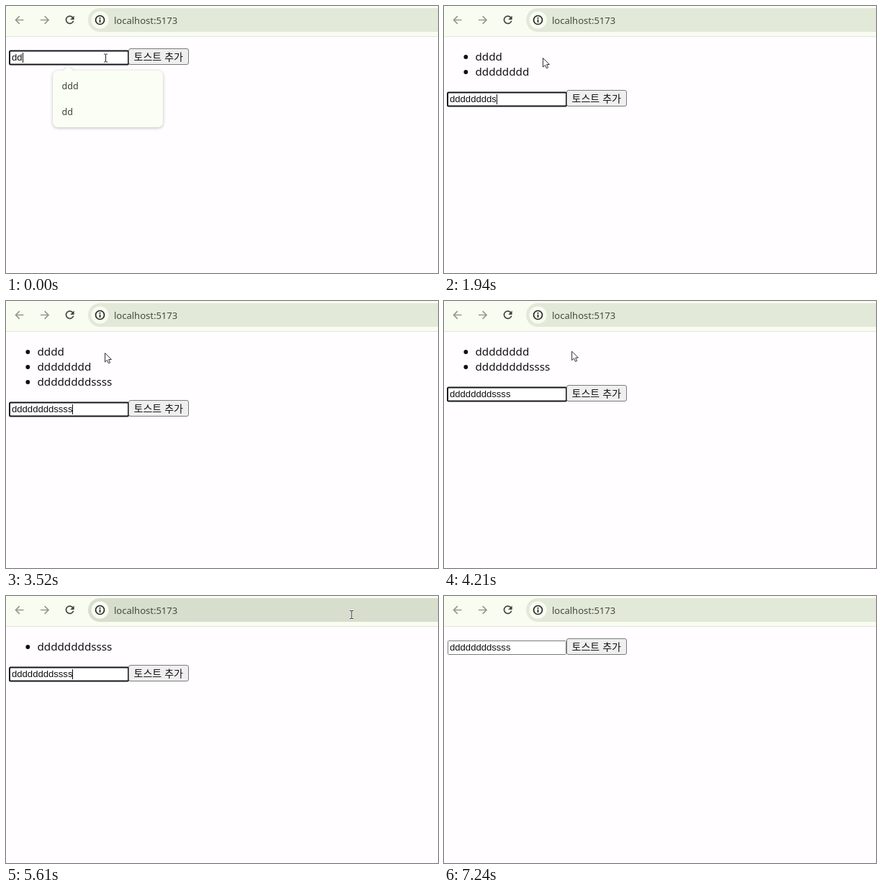
An HTML page that plays this animation: 600 by 372 pixels, repeating every 7.27 s.

```html
<!DOCTYPE html>
<html lang="ko">
<head>
<meta charset="utf-8">
<title>Toast list</title>
<style>
  html, body { margin: 0; width: 100%; height: 100%; overflow: hidden; background: #fffdff; }
  svg { display: block; width: 600px; height: 372px; }
  .ui { font: 13px "Noto Sans", sans-serif; fill: #454a40; }
  .item { font: 15.2px "Noto Sans", sans-serif; fill: #111; }
  .hint { font: 12.5px "Noto Sans", sans-serif; fill: #3b3e38; }
  .field { font: 13.1px "Liberation Sans", sans-serif; fill: #111; }
  .button { font: 14px "Noto Sans CJK KR", "Noto Sans CJK", sans-serif; fill: #111; }
  .icon { fill: none; stroke-width: 1.7; }
  #popup { filter: drop-shadow(0 1px 2px rgba(60, 70, 50, .35)); }
</style>
</head>
<body>
<svg viewBox="0 0 600 372">
  <rect width="600" height="372" fill="#fffdff"/>

  <g id="toolbar">
    <rect width="600" height="42" fill="#f8fcf1"/>
    <rect y="42" width="600" height="1" fill="#e0e6d9"/>
    <rect id="address" x="114" y="3" width="520" height="33" rx="16.5"/>
    <circle cx="130.5" cy="19.5" r="12" fill="#f9fcf2"/>
    <path class="icon" stroke="#959a90" d="M24.5 19.5H13.5M18.8 14.2L13.5 19.5L18.8 24.8"/>
    <path class="icon" stroke="#959a90" d="M48 19.5H59M53.7 14.2L59 19.5L53.7 24.8"/>
    <path class="icon" stroke="#42463d" d="M92.9 16.2A5.2 5.2 0 1 0 93.7 20.6"/>
    <path fill="#42463d" d="M94.6 13.4V18.9H89.1Z"/>
    <circle class="icon" stroke="#23261f" cx="130.5" cy="19.5" r="6"/>
    <path fill="#23261f" d="M129.6 18.7h1.8v4.2h-1.8zM129.6 16h1.8v1.7h-1.8z"/>
    <text class="ui" x="150" y="24.6">localhost:5173</text>
  </g>

  <g id="list"></g>

  <g id="form">
    <rect id="box" fill="#fff"/>
    <text id="value" class="field" x="8" y="76"></text>
    <rect id="caret" y="65" width="1" height="14" fill="#111"/>
    <rect x="170.5" y="59.5" width="83" height="22" rx="2.5" fill="#efefef" stroke="#7b7b7b"/>
    <text class="button" x="177.6" y="75.6">토스트 추가</text>
  </g>

  <g id="popup">
    <path id="bubble" fill="#fbfef4"/>
    <text class="hint" x="77.5" y="116">ddd</text>
    <text id="second" class="hint" x="77.5" y="151.5">dd</text>
  </g>

  <g id="pointer">
    <path id="arrow" fill="#fff" stroke="#333" d="M.5 .5V13L3.4 10.3L5.4 14.8L7.5 13.9L5.6 9.5H9.4Z"/>
    <g id="beam" fill="none">
      <path stroke="#fff" stroke-width="2.6" d="M-2.5 -5.5H2.5M0 -5.5V5.5M-2.5 5.5H2.5"/>
      <path stroke="#222" d="M-2.5 -5.5H-.7L0 -5L.7 -5.5H2.5M0 -5V5M-2.5 5.5H-.7L0 5L.7 5.5H2.5"/>
    </g>
  </g>
</svg>

<script>
const LOOP = 7270, BLINK = 528, BLUR_AT = 7210;

const keys = [
  [0, "d"], [0, "d"], [90, "d"], [290, "d"],
  [1030, "d"], [1180, "d"], [1330, "d"], [1480, "d"],
  [1940, "s"], [2090, "s"], [2240, "s"], [2420, "s"]
];
const toasts = [
  { from: 550, to: 3550, text: "dddd" },
  { from: 1700, to: 4730, text: "dddddddd" },
  { from: 2620, to: 5640, text: "ddddddddssss" }
];
// time, x, y
const path = [
  [0, 138.5, 72.5], [600, 138.5, 72.5], [600, 137, 72], [4030, 137, 72],
  [4150, 151, 72], [4400, 258, 62], [4670, 409, 50], [4730, 449, 42],
  [4810, 472, 30], [4920, 480, 26], [5910, 480, 26], [6090, 486, 15],
  [6270, 495, -18]
];

const $ = id => document.getElementById(id);
const set = (el, attrs) => Object.entries(attrs).forEach(([k, v]) => el.setAttribute(k, v));
const show = (el, on) => el.style.display = on ? "" : "none";
const ramp = (t, from, to) => Math.min(1, Math.max(0, (t - from) / (to - from)));

const rows = toasts.map(({ text }) => {
  const row = document.createElementNS("http://www.w3.org/2000/svg", "g");
  row.innerHTML = `<circle cx="30.3" cy="71" r="2.9" fill="#111"/><text class="item" x="43.5" y="76">${text}</text>`;
  $("list").append(row);
  return row;
});

function pointerAt(t) {
  const i = path.findIndex(p => p[0] > t);
  if (i < 0) return path[path.length - 1].slice(1);
  const [a, b] = [path[i - 1], path[i]];
  const k = ramp(t, a[0], b[0]);
  return [a[1] + (b[1] - a[1]) * k, a[2] + (b[2] - a[2]) * k];
}

function drawList(t) {
  let count = 0;
  toasts.forEach(({ from, to }, i) => {
    const on = t >= from && t < to;
    show(rows[i], on);
    if (on) set(rows[i], { transform: `translate(0 ${Math.round(21.2 * count++)})` });
  });
  set($("form"), { transform: `translate(0 ${count ? 16 + 21 * count : 0})` });
}

function drawField(t) {
  const typed = keys.filter(k => k[0] <= t);
  const lastKey = typed[typed.length - 1][0];
  const blinkStart = lastKey === 2420 ? 2440 : lastKey;
  const focused = t < BLUR_AT;
  $("value").textContent = typed.map(k => k[1]).join("");
  set($("caret"), { x: Math.round(8 + $("value").getComputedTextLength()) });
  show($("caret"), focused && Math.floor(Math.max(0, t - blinkStart) / BLINK) % 2 === 0);
  set($("box"), focused
    ? { x: 5, y: 62.5, width: 165, height: 19, rx: 1.5, stroke: "#14161b", "stroke-width": 2 }
    : { x: 5.5, y: 62.5, width: 164, height: 19, rx: 1, stroke: "#7b7b7b", "stroke-width": 1 });
}

function drawPopup(t) {
  const both = t < 90, bottom = both ? 169 : 134;
  show($("popup"), t < 390);
  show($("second"), both);
  $("popup").style.opacity = 1 - ramp(t, 300, 390);
  set($("bubble"), {
    d: `M73 90H80L86.5 83L93 90H210q8 0 8 8V${bottom - 8}q0 8 -8 8H73q-8 0 -8 -8V98q0 -8 8 -8Z`
  });
}

function drawPointer(t) {
  const beam = t < 600 || (t >= 4770 && t < 6180);
  const hover = ramp(t, 4770, 4920) - ramp(t, 6150, 6290);
  const mix = (a, b) => Math.round(a + (b - a) * hover);
  set($("pointer"), { transform: `translate(${pointerAt(t)})` });
  show($("arrow"), !beam);
  show($("beam"), beam);
  set($("address"), { fill: `rgb(${mix(226, 215)},${mix(233, 222)},${mix(217, 205)})` });
}

function draw(t) {
  drawList(t);
  drawField(t);
  drawPopup(t);
  drawPointer(t);
}

const start = performance.now();
function tick() {
  draw((performance.now() - start) % LOOP);
  requestAnimationFrame(tick);
}
tick();
</script>
</body>
</html>
```
